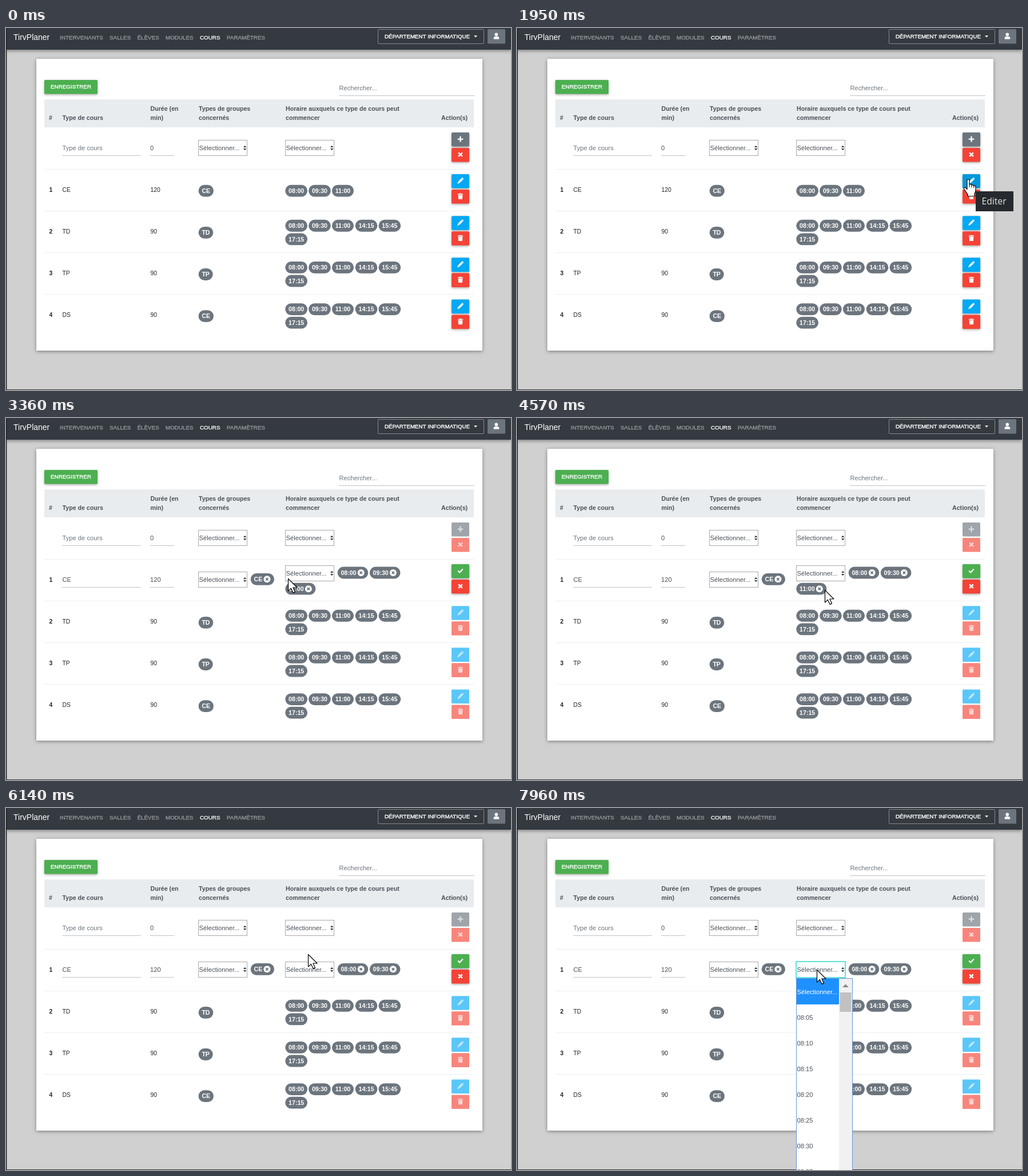
An HTML page with a canvas that plays this animation: 883x634 px, repeating every 8000 ms.

```html
<!DOCTYPE html>
<html lang="fr">
<head>
<meta charset="utf-8">
<title>Types de cours</title>
<style>
  html, body { margin: 0; width: 100%; height: 100%; overflow: hidden; background: #d0d0d0; }
  canvas { display: block; width: 883px; height: 634px; }
</style>
</head>
<body>
<canvas id="stage"></canvas>
<script>
const W = 883, H = 634, LOOP = 8000;
const SANS = '"Liberation Sans", Arial, sans-serif';
const GREY = '#6c757d', RED = '#f44336', BLUE = '#03a9f4', GREEN = '#4caf50', DARK = '#343a40';
const EDIT = 2410, REMOVE = 5620, OPEN = 7090;
const ROW = 73.15;

const canvas = document.getElementById('stage');
const dpr = window.devicePixelRatio || 1;
canvas.width = W * dpr;
canvas.height = H * dpr;
const c = canvas.getContext('2d');

// Pointer moves: start, end, steps, target x, target y
const moves = [
  [300, 300, 1, 656, 558], [380, 540, 3, 577, 300], [610, 610, 1, 580, 270],
  [910, 1250, 5, 665, 260], [1340, 1700, 6, 785, 265], [1870, 1870, 1, 789, 265],
  [2880, 3030, 3, 507, 282], [3360, 3360, 1, 493, 281], [3440, 3720, 5, 620, 295],
  [4180, 4570, 6, 538, 301], [4660, 4740, 2, 529, 296], [4960, 4960, 1, 528, 295],
  [5970, 6140, 3, 528, 256], [6290, 6520, 4, 526, 271], [7550, 7960, 6, 524, 283]
];

function stepped(t, start, end, n) {
  if (t < start) return 0;
  if (t >= end) return 1;
  return (Math.floor((t - start) / (end - start) * (n - 1) + 1e-6) + 1) / n;
}

function pointerAt(t) {
  let x = 656, y = 640;
  for (const [start, end, n, tx, ty] of moves) {
    const p = stepped(t, start, end, n);
    x += (tx - x) * p;
    y += (ty - y) * p;
  }
  return [Math.round(x), Math.round(y)];
}

function rect(x, y, w, h, color) {
  c.fillStyle = color;
  c.fillRect(x, y, w, h);
}

function round(x, y, w, h, r, color) {
  c.fillStyle = color;
  c.beginPath();
  c.roundRect(x, y, w, h, r);
  c.fill();
}

function withShadow(blur, dy, alpha, draw) {
  c.save();
  c.shadowColor = `rgba(0,0,0,${alpha})`;
  c.shadowBlur = blur * dpr;
  c.shadowOffsetY = dy * dpr;
  draw();
  c.restore();
}

function text(s, x, y, size, color, { bold = false, heavy = 0, family = SANS } = {}) {
  c.font = `${bold ? 'bold ' : ''}${size}px ${family}`;
  c.fillStyle = color;
  c.fillText(s, x, y);
  if (heavy) {
    c.strokeStyle = color;
    c.lineWidth = heavy;
    c.strokeText(s, x, y);
  }
}

function poly(points, color) {
  c.beginPath();
  points.forEach(([x, y]) => c.lineTo(x, y));
  c.closePath();
  c.fillStyle = color;
  c.fill();
}

function lines(color, width, ...paths) {
  c.strokeStyle = color;
  c.lineWidth = width;
  c.beginPath();
  for (const p of paths) p.forEach(([x, y], i) => i ? c.lineTo(x, y) : c.moveTo(x, y));
  c.stroke();
}

function cross(r, width, color) {
  lines(color, width, [[-r, -r], [r, r]], [[r, -r], [-r, r]]);
}

const icons = {
  plus: () => lines('#fff', 2.3, [[-4.8, 0], [4.8, 0]], [[0, -4.8], [0, 4.8]]),
  times: () => cross(3.3, 2.5, '#fff'),
  check: () => lines('#fff', 2.2, [[-4.3, 0], [-1.4, 3], [4.4, -3]]),
  pencil: () => {
    c.rotate(Math.PI / 4);
    rect(-1.8, -4.2, 3.6, 8, '#fff');
    round(-1.8, -6.6, 3.6, 2, [1, 1, 0, 0], '#fff');
    poly([[-1.8, 4.2], [1.8, 4.2], [0, 7.4]], '#fff');
  },
  trash: () => {
    rect(-4.6, -4.3, 9.2, 1.4, '#fff');
    rect(-1.6, -5.2, 3.2, 1.2, '#fff');
    poly([[-3.9, -2.2], [3.9, -2.2], [3.4, 5.2], [-3.4, 5.2]], '#fff');
  }
};

function button(y, color, icon, alpha = 1) {
  c.save();
  c.globalAlpha = alpha;
  const box = () => round(779, y, 31, 24.6, 1.5, color);
  if (alpha === 1) withShadow(4, 1.5, 0.35, box);
  else box();
  c.translate(794.5, y + 11.6);
  icons[icon]();
  c.restore();
}

function badge(x, cy, label, closable) {
  c.font = `bold 10.6px ${SANS}`;
  const w = c.measureText(label).width + 11.6 + (closable ? 15 : 0);
  round(x, cy - 10.4, w, 20.8, 10.4, GREY);
  text(label, x + 5.8, cy + 3.8, 10.6, '#fff', { bold: true });
  if (closable) {
    c.save();
    c.translate(x + w - 12.6, cy);
    c.fillStyle = '#fff';
    c.beginPath();
    c.arc(0, 0, 6, 0, 7);
    c.fill();
    cross(2.1, 1.8, GREY);
    c.restore();
  }
}

function select(x, y, glow = 0) {
  rect(x, y, 86, 28, '#fff');
  c.strokeStyle = '#a9a9a9';
  c.lineWidth = 1;
  c.strokeRect(x + 0.5, y + 0.5, 85, 27);
  if (glow) {
    c.save();
    c.globalAlpha = glow;
    c.strokeStyle = '#5fe3dd';
    c.lineWidth = 2;
    c.strokeRect(x, y, 86, 28);
    c.restore();
  }
  text('Sélectionner...', x + 1.5, y + 18, 11.2, '#495057');
  poly([[x + 79, y + 13], [x + 84.4, y + 13], [x + 81.7, y + 9.8]], DARK);
  poly([[x + 79, y + 15], [x + 84.4, y + 15], [x + 81.7, y + 18.2]], DARK);
}

function field(s, x, w, y, color) {
  text(s, x, y + 4, 11.2, color);
  rect(x, y + 13, w, 1, '#bfc3c7');
}

function navbar() {
  withShadow(6, 2, 0.4, () => rect(0, 0, W, 38, DARK));
  text('TirvPlaner', 13, 21, 14, '#fff');
  const items = [['INTERVENANTS', 94], ['SALLES', 181], ['ÉLÈVES', 229.5],
    ['MODULES', 279], ['COURS', 339], ['PARAMÈTRES', 386]];
  for (const [label, x] of items) {
    text(label, x, 19.7, 9.85, label === 'COURS' ? '#fff' : '#999c9f', { heavy: 0.3 });
  }
  c.strokeStyle = '#868a8e';
  c.lineWidth = 1;
  c.beginPath();
  c.roundRect(650.5, 2.5, 185, 25, 1.5);
  c.stroke();
  text('DÉPARTEMENT INFORMATIQUE', 662, 17.8, 9.73, '#fff', { heavy: 0.4 });
  poly([[818, 13.2], [824.2, 13.2], [821.1, 16.4]], '#fff');

  round(842, 2, 31, 25.5, 1.5, GREY);
  c.fillStyle = '#fff';
  c.beginPath();
  c.arc(857.3, 11.4, 2.8, 0, 7);
  c.fill();
  round(852.5, 14.8, 9.8, 4.8, [3.5, 3.5, 1, 1], '#fff');
}

function tableHead() {
  withShadow(4, 1.5, 0.35, () => round(67, 91, 93, 24.4, 1.5, GREEN));
  text('ENREGISTRER', 78, 106, 9.83, '#fff', { heavy: 0.4 });
  text('Rechercher...', 582.5, 109, 11.1, GREY);
  rect(582, 118, 237, 1, '#bfc3c7');

  rect(67, 125, 751, 49, '#e9ecef');
  const heads = [['#', 75, 1], ['Type de cours', 98.5, 1], ['Durée (en', 252.5, 0], ['min)', 252.5, 1],
    ['Types de groupes', 337, 0], ['concernés', 337, 1],
    ['Horaire auxquels ce type de cours peut', 489, 0], ['commencer', 489, 1], ['Action(s)', 761, 1]];
  for (const [label, x, line] of heads) {
    text(label, x, 144.8 + line * 15.7, 10.65, '#495057', { bold: true });
  }
}

function newRow(fade) {
  field('Type de cours', 98.5, 137, 210, GREY);
  field('0', 252, 42, 210, '#495057');
  select(336, 196);
  select(488, 196);
  button(183, GREY, 'plus', fade);
  button(210, RED, 'times', fade);
}

function editRow(t) {
  const removed = t >= REMOVE;
  const glow = t >= OPEN + 60 ? 1 : t >= OPEN ? 0.5 : 0;
  field('CE', 98.5, 137, 283, '#495057');
  field('120', 252, 42, 283, '#495057');
  select(336, 269);
  badge(427.7, 282.3, 'CE', true);
  select(488, removed ? 269 : 258, glow);
  const cy = removed ? 282.3 : 271;
  badge(579.6, cy, '08:00', true);
  badge(635.8, cy, '09:30', true);
  if (!removed) badge(488.3, 299.2, '11:00', true);
  button(256, GREEN, 'check');
  button(283, RED, 'times');
}

function courseRow(i, kind, minutes, hover, fade) {
  const mid = 283.3 + (i - 1) * ROW;
  text(kind, 98.5, mid + 3.7, 10.4, '#212529');
  text(minutes, 252.5, mid + 3.7, 10.4, '#212529');
  badge(336.6, mid + 1.9, i === 4 ? 'CE' : kind, false);
  const hours = ['08:00', '09:30', '11:00', '14:15', '15:45', '17:15'].slice(0, i === 1 ? 3 : 6);
  const top = i === 1 ? mid + 1.9 : mid - 10.2;
  hours.forEach((h, k) => badge(488.3 + (k % 5) * 40.8, top + Math.floor(k / 5) * 23.6, h, false));
  button(mid - 27.3, hover ? '#0398db' : BLUE, 'pencil', fade);
  button(mid - 0.3, RED, 'trash', fade);
}

function dropdown() {
  rect(488, 298, 99, 340, '#6c93d6');
  rect(489, 299, 97, 340, '#fff');
  rect(489, 299, 74, 45, '#1e90ff');
  text('Sélectionner...', 489.5, 325.5, 11.2, '#fff');
  for (let i = 1; i <= 7; i++) {
    text('08:' + String(i * 5).padStart(2, '0'), 489.5, 325.5 + i * 45, 11.2, '#495057');
  }
  rect(563, 299, 23, 340, '#f1f1f1');
  poly([[569, 314], [580, 314], [574.5, 308.5]], '#8a8a8a');
  rect(564.5, 323, 20, 34, '#c1c1c1');
}

function tooltip(alpha) {
  c.save();
  c.globalAlpha = alpha;
  rect(802, 286, 66, 35, '#26292d');
  text('Editer', 812.5, 309, 15.7, '#e4e4e4', { family: '"Open Sans", "Noto Sans", sans-serif' });
  c.restore();
}

function outline(path) {
  c.lineJoin = 'round';
  c.fillStyle = '#fff';
  c.fill(path);
  c.strokeStyle = '#000';
  c.lineWidth = 1.2;
  c.stroke(path);
}

const arrowPath = new Path2D('M.5 .5V22L5.4 17.4L9.2 25.4L12.6 23.9L8.9 16H16Z');
const handPath = new Path2D('M-2 2Q-2 0 0 0Q2 0 2 2V9Q5 7.6 6 10Q9 9 9.7 11.3Q13 10.4 13 13.5V19' +
  'Q13 22 11 25V29.5H-1V26Q-4 22 -7 17.5Q-8.6 15 -6.5 14.2Q-5 13.8 -2 17.5Z');

function pointer(t) {
  const [x, y] = pointerAt(t);
  c.save();
  c.translate(x, y);
  if (x >= 779) {
    outline(handPath);
    lines('#000', 1, [[2, 9], [2, 14]], [[6, 10], [6, 14.5]], [[9.7, 11.3], [9.7, 15]]);
  } else {
    outline(arrowPath);
  }
  c.restore();
}

function draw(t) {
  const editing = t >= EDIT;
  const fade = 1 - 0.35 * stepped(t, 2560, 2730, 3);
  c.setTransform(dpr, 0, 0, dpr, 0, 0);
  rect(0, 0, W, H, '#d0d0d0');
  navbar();
  withShadow(6, 1.5, 0.4, () => round(53, 54, 780, 511, 1, '#fff'));
  tableHead();
  newRow(fade);
  ['CE', 'TD', 'TP', 'DS'].forEach((kind, k) => {
    const i = k + 1;
    rect(67, Math.round(247 + k * ROW), 751, 1, '#eceef0');
    text(String(i), 75.5, 287 + k * ROW, 10.4, '#212529', { bold: true });
    if (i === 1 && editing) editRow(t);
    else courseRow(i, kind, i === 1 ? '120' : '90', i === 1 && t >= 1700, fade);
  });
  rect(0, 0, 1.4, H, '#232323');
  rect(0, 633, W, 1, '#303030');
  if (t >= OPEN) dropdown();
  if (t >= 1870 && !editing) tooltip(t < 1950 ? 0.5 : 1);
  if (t >= 300) pointer(t);
}

function frame() {
  draw(performance.now() % LOOP);
  requestAnimationFrame(frame);
}
frame();
</script>
</body>
</html>
```
